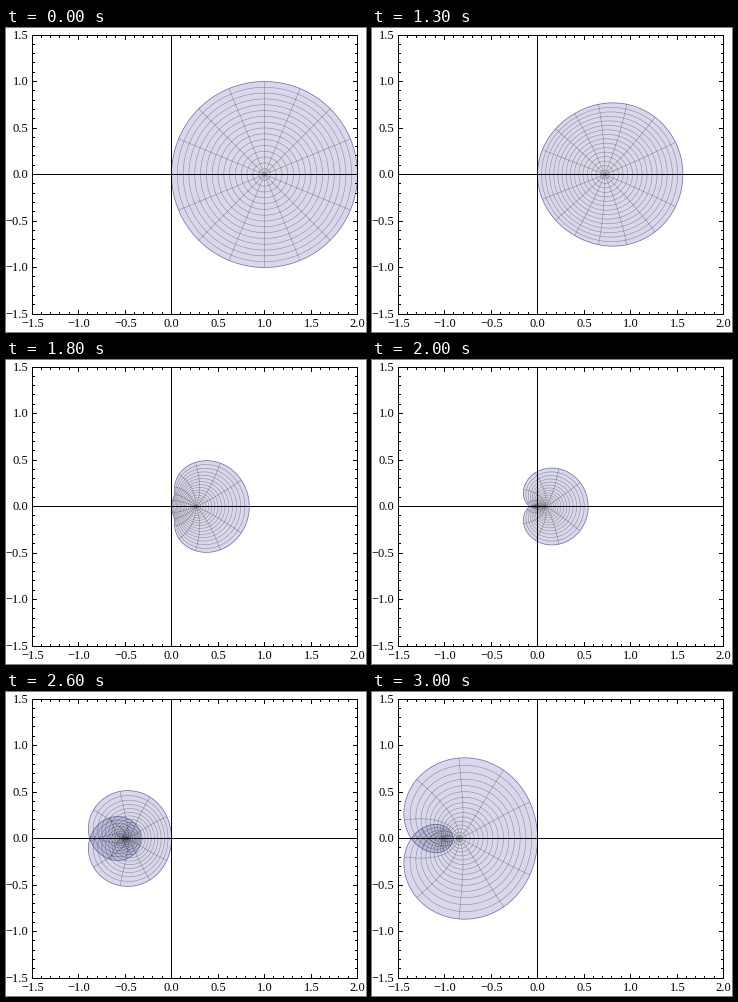
Write a matplotlib script that moves like this. It is 360 px wide and 304 px high and loops after 4.1 s.

```python
import numpy as np
import matplotlib.pyplot as plt
from matplotlib.animation import FuncAnimation
from matplotlib.collections import LineCollection

W, H, DPI = 360, 304, 100
PX = 72 / DPI             # points per pixel
UNIT = 93                 # pixels per data unit
X0, Y0 = 165.5, 146.5     # pixel position of the origin
LEFT, RIGHT, TOP, BOTTOM = 26, 351, 7, 286
BLUE = (0.2472, 0.24, 0.6)
HOLD, STEPS, INTERVAL, FRAMES = 10, 20, 100, 41

fig = plt.figure(figsize=(W / DPI, H / DPI), dpi=DPI, facecolor="white")
ax = fig.add_axes([0, 0, 1, 1])
ax.set_xlim(0, W)
ax.set_ylim(H, 0)
ax.axis("off")


def to_px(w):
    return np.column_stack([X0 + UNIT * w.real, Y0 - UNIT * w.imag])


def center(v):
    return np.floor(v) + 0.5


def draw_frame():
    segs = [[(LEFT, y + 0.5), (RIGHT + 1, y + 0.5)] for y in (TOP, 146, BOTTOM)]
    segs += [[(x + 0.5, TOP), (x + 0.5, BOTTOM + 1)] for x in (LEFT, 165, RIGHT)]
    text = dict(family="Liberation Serif", size=12.5 * PX, color="black")
    for n in range(-15, 21):
        size = 5 if n % 5 == 0 else 3
        label = f"{n / 10:.1f}".replace("-", "\u2212")
        x = center(X0 + UNIT * n / 10)
        segs += [[(x, TOP), (x, TOP + size)],
                 [(x, BOTTOM + 1), (x, BOTTOM + 1 - size)]]
        if n % 5 == 0:
            ax.text(x, 299, label, ha="center", va="baseline", **text)
        if n <= 15:
            y = center(Y0 - UNIT * n / 10)
            segs += [[(LEFT, y), (LEFT + size, y)],
                     [(RIGHT + 1, y), (RIGHT + 1 - size, y)]]
            if n % 5 == 0:
                ax.text(22.5, y + 3.5, label, ha="right", va="baseline", **text)
    ax.add_collection(LineCollection(segs, colors="black", linewidths=PX,
                                     zorder=5, snap=False))


# Unit disk around 1, with its polar mesh
theta = np.linspace(0, 2 * np.pi, 241)
rim = 1 + np.exp(1j * theta)
radii = np.arange(1, 16) / 16
rings = [1 + r * np.exp(1j * theta) for r in radii]
spokes = [1 + np.linspace(0, 1, 40) * np.exp(2j * np.pi * k / 16)
          for k in range(16) if k % 8]  # the axis hides the real ones
diameter = np.linspace(0, 2, 121)
upper = np.concatenate([rim[:121], diameter])

# Two half disks, so that overlapping sheets darken each other
halves = [ax.fill([0, 1, 1], [0, 0, 1], color=BLUE, alpha=0.2, lw=0,
                  zorder=1, snap=False)[0] for _ in range(2)]
mesh = LineCollection([], colors=[(0, 0, 0, 0.33)], linewidths=0.6 * PX,
                      zorder=2, snap=False)
ax.add_collection(mesh)
edge, = ax.plot([], [], color=BLUE, lw=0.7 * PX, alpha=0.75, zorder=3, snap=False)
draw_frame()


def morph(z, t):
    """Straight homotopy from z to -sin z."""
    return (1 - t) * z - t * np.sin(z)


def update(i):
    t = np.clip(i - HOLD, 0, STEPS) / STEPS
    half = morph(upper, t)
    halves[0].set_xy(to_px(half))
    halves[1].set_xy(to_px(half.conj()))
    mesh.set_segments([to_px(morph(c, t)) for c in rings + spokes])
    edge.set_data(*to_px(morph(rim, t)).T)
    return [*halves, mesh, edge]


anim = FuncAnimation(fig, update, frames=FRAMES, interval=INTERVAL,
                     repeat=True, repeat_delay=0, blit=False)
plt.show()
```
